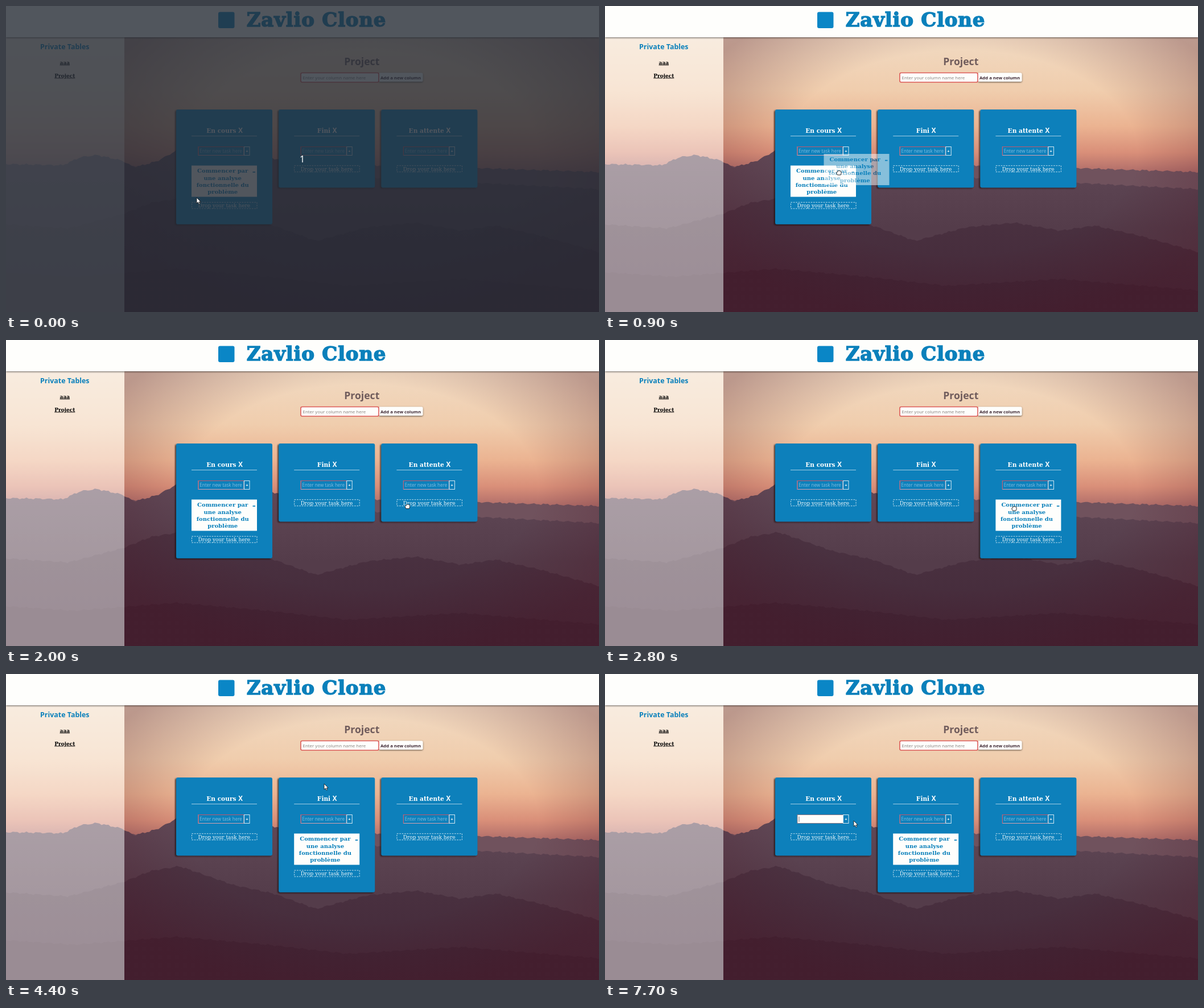
Animation of 1042 by 538 pixels, one loop 8 s. Source, as an HTML page:

```html
<!DOCTYPE html>
<html lang="fr">
<head>
<meta charset="utf-8">
<title>Task board</title>
<style>
  html, body { margin: 0; width: 100%; height: 100%; overflow: hidden; }
  svg { display: block; width: 1042px; height: 538px; }
  .sans { font-family: "Noto Sans", "Open Sans", sans-serif; }
  .serif { font-family: "DejaVu Serif", serif; }
  .bold { font-weight: 700; }
  .mid { text-anchor: middle; }
</style>
</head>
<body>
<svg viewBox="0 0 1042 538">
  <defs>
    <linearGradient id="sky" x2="0" y2="1">
      <stop offset="0" stop-color="#f1dac2"/>
      <stop offset=".35" stop-color="#f0cdad"/>
      <stop offset=".58" stop-color="#ebb391"/>
      <stop offset=".75" stop-color="#d98f79"/>
      <stop offset=".87" stop-color="#b26f6a"/>
      <stop offset="1" stop-color="#7d5560"/>
    </linearGradient>
    <linearGradient id="far" x2="0" y2="1">
      <stop offset="0" stop-color="#624a58"/>
      <stop offset=".5" stop-color="#543c4a"/>
    </linearGradient>
    <linearGradient id="near" x2="0" y2="1">
      <stop offset="0" stop-color="#4b3342"/>
      <stop offset="1" stop-color="#432838"/>
    </linearGradient>
    <radialGradient id="vignette" cx=".5" cy=".42" r=".62">
      <stop offset=".6" stop-color="#4a1020" stop-opacity="0"/>
      <stop offset="1" stop-color="#4a1020" stop-opacity=".32"/>
    </radialGradient>
    <filter id="drop" x="-10%" y="-10%" width="120%" height="120%">
      <feDropShadow dx="-2" dy="1.5" stdDeviation="1.2" flood-color="#1a0d18" flood-opacity=".75"/>
    </filter>
    <filter id="soft" x="-10%" y="-30%" width="120%" height="180%">
      <feDropShadow dx="0" dy="1" stdDeviation="1.5" flood-opacity=".6"/>
    </filter>
    <g id="card">
      <rect width="115" height="55" fill="#fefefc"/>
      <g class="serif bold mid" font-size="10" fill="#0a80bb">
        <text x="54.7" y="12.5">Commencer par</text>
        <text x="54.7" y="25">une analyse</text>
        <text x="54.7" y="37.4">fonctionnelle du</text>
        <text x="54.7" y="49.8">problème</text>
      </g>
      <rect x="107.5" y="10.7" width="4.5" height="1.7" fill="#0a80bb"/>
    </g>
    <path id="arrow" d="M0 0V10L2.4 7.8 4 11.4 5.7 10.6 4.2 7.2H7.2Z" fill="#fff" stroke="#111" stroke-width=".8"/>
    <path id="fist" d="M-4 0Q-4-1.5-2.3-1.3V-2.5Q-1.2-4 0-3 1.2-4 2.2-2.8 4-3.2 4-1V1.5L3 4H-2.5L-4 1.5Z" fill="#fff" stroke="#111" stroke-width=".9"/>
    <path id="beam" d="M-2-5.5H2M0-5.5V5.5M-2 5.5H2" fill="none" stroke="#222" stroke-width="1"/>
  </defs>

  <rect y="55" width="1042" height="270" fill="url(#sky)"/>
  <g id="ridges"></g>
  <rect x="208" y="55" width="834" height="483" fill="url(#vignette)"/>
  <rect y="55" width="208" height="483" fill="#fff" opacity=".47"/>

  <rect width="1042" height="55" fill="#fefefc" filter="url(#soft)"/>
  <rect x="373" y="10.5" width="28.5" height="28.5" rx="3" fill="#0a86c6"/>
  <text class="serif bold mid" x="545.5" y="36" font-size="34" letter-spacing=".8" fill="#0a80bb" stroke="#0a80bb" stroke-width="1.5">Zavlio Clone</text>

  <text class="sans mid" x="103.3" y="76" font-size="12.4" font-weight="600" fill="#0a80bb">Private Tables</text>
  <g class="serif bold mid" font-size="9" text-decoration="underline">
    <text x="103.3" y="102.5">aaa</text>
    <text x="103.3" y="125.5">Project</text>
  </g>

  <text class="sans bold mid" x="625.3" y="103.5" font-size="17.6" fill="#705c5c">Project</text>
  <rect x="655" y="117.5" width="77.5" height="15.5" rx="2.5" fill="#fefefc" filter="url(#soft)"/>
  <rect x="518" y="117.5" width="137" height="16.5" rx="2.5" fill="#fefefc" stroke="#dc5a58" stroke-width="1.6"/>
  <text class="sans" x="521.5" y="128.7" font-size="7.9" fill="#8c8684">Enter your column name here</text>
  <text class="sans bold mid" x="693.5" y="128.7" font-size="7.75" fill="#3a2430">Add a new column</text>

  <g id="board"></g>
</svg>
<script>
const LOOP = 8000, TICK = 100;
const BLUE = '#0a80bb';
const columns = [['En cours', 299], ['Fini', 479.2], ['En attente', 659.4]];

// Each ridge runs through a few [x, y] points, roughened with small waves.
function ridge(points, fill) {
  let d = 'M0 538';
  for (let x = 0, i = 0; x <= 1044; x += 4) {
    while (i < points.length - 2 && x > points[i + 1][0]) i++;
    const [x0, y0] = points[i], [x1, y1] = points[i + 1];
    const y = y0 + (y1 - y0) * (x - x0) / (x1 - x0) + Math.sin(x * .31) + .7 * Math.sin(x * .83);
    d += `L${x} ${y.toFixed(1)}`;
  }
  return `<path d="${d}V538Z" fill="${fill}"/>`;
}

document.getElementById('ridges').innerHTML =
  ridge([[0, 282], [640, 280], [830, 285], [1044, 292]], '#70525d') +
  ridge([[0, 278], [100, 280], [130, 266], [160, 262], [205, 272], [225, 284], [265, 273], [300, 254],
         [345, 241], [400, 247], [470, 268], [560, 288], [650, 302], [830, 311], [1044, 322]], 'url(#far)') +
  ridge([[0, 384], [110, 391], [208, 365], [255, 346], [305, 338], [400, 371], [470, 386], [545, 413],
         [635, 389], [720, 381], [800, 395], [860, 386], [940, 404], [1044, 433]], 'url(#near)') +
  ridge([[0, 468], [120, 476], [300, 462], [460, 476], [600, 492], [800, 480], [1044, 500]], '#402535');

// Pointer steps: time, x, y, shape, and the grab point of a dragged card.
const grabA = [26.5, 33], grabB = [33, 16];
const steps = [
  [0, 335, 337, 'arrow'], [100, 335, 338, 'fist'], [200, 350, 326, 'fist'], [400, 361, 314, 'fist'],
  [700, 384, 295, 'fist', grabA], [800, 397, 294, 'fist', grabA]
];
for (let i = 0; i <= 6; i++)
  steps.push([900 + i * TICK, 411 + i * 46.6, 293 - 3 * Math.sin(i * Math.PI / 4), 'fist', grabA]);
steps.push(
  [1600, 685.5, 297, 'fist', grabA], [1700, 672, 297, 'fist', grabA], [1800, 705.5, 292.5, 'fist', grabA],
  [2000, 705.5, 292.5, 'fist'], [2800, 719, 296, 'fist'],
  [2900, 704, 280, 'fist', grabB], [3000, 692, 290, 'fist', grabB], [3200, 640, 287, 'fist', grabB],
  [3300, 590, 285, 'fist', grabB], [3400, 556, 284, 'fist', grabB], [3700, 537, 282, 'fist', grabB],
  [3800, 539, 284, 'fist'], [4400, 559, 193, 'arrow'], [4500, 558.5, 159, 'arrow'],
  [4700, 558.5, 145, 'arrow'], [4900, 480, 205, 'arrow'], [5000, 402, 255, 'beam'],
  [7500, 415, 257, 'beam'], [7600, 430, 257, 'arrow'], [7700, 437, 258, 'arrow']
);

const use = (id, x, y, extra = '') => `<use href="#${id}" x="${x}" y="${y}" ${extra}/>`;

function column([name, x], hasCard, focused, caret) {
  const shift = hasCard ? 64.5 : 0;
  const field = focused
    ? `<rect x="39" y="65.5" width="80.5" height="15" fill="#fefefc" stroke="#8a7480"/>` +
      (caret ? '<path d="M42 68.5V78" stroke="#555" stroke-width=".8"/>' : '')
    : `<rect x="39" y="65.5" width="80" height="15" fill="none" stroke="#d6a0ae"/>
       <path d="M39 80.5V65.5H119" fill="none" stroke="#c4566a"/>
       <text class="sans" x="41.3" y="75.8" font-size="8" fill="#7dbade">Enter new task here</text>`;
  return `<g transform="translate(${x} 182)">
    <rect width="169" height="${137.3 + shift}" rx="3" fill="${BLUE}" filter="url(#drop)"/>
    <text class="serif bold mid" x="85" y="41" font-size="10.6" fill="#fff">${name}
      <tspan class="sans" font-size="11.5">X</tspan></text>
    <path d="M27 46.6H142" stroke="#a5cfe5"/>
    ${field}
    <rect x="119.5" y="65.5" width="9.5" height="15" fill="none" stroke="#d5e8f2"/>
    <text class="sans bold mid" x="124.3" y="75.6" font-size="7.5" fill="#fff">+</text>
    ${hasCard ? use('card', 27, 98.5) : ''}
    <g transform="translate(0 ${shift})">
      <rect x="27.5" y="98.7" width="114.5" height="11" fill="none" stroke="#d5e8f2" stroke-width=".9" stroke-dasharray="2.6 1.8"/>
      <text class="serif mid" x="84.3" y="107.5" font-size="9" fill="#f1f8fb">Drop your task here</text>
    </g>
  </g>`;
}

function scene(t) {
  const [, x, y, shape, grab] = steps.findLast(step => step[0] <= t);
  const owner = t < 2800 ? 0 : t < 4000 ? 2 : 1;
  const caret = t < 6500 || t >= 7500;
  const intro = t < 100
    ? `<rect width="1042" height="538" fill="#262c36" opacity=".8"/>
       <text class="sans mid" x="520.5" y="275" font-size="16" fill="#fff">1</text>` : '';
  return columns.map((c, i) => column(c, i === owner, i === 0 && t >= 5300, caret)).join('') +
    (grab ? use('card', x - grab[0], y - grab[1], 'opacity=".5"') : '') +
    intro + use(shape, x, y);
}

const board = document.getElementById('board');
let shown = -1;
function frame() {
  const t = Math.floor(performance.now() % LOOP / TICK) * TICK;
  if (t !== shown) board.innerHTML = scene(shown = t);
  requestAnimationFrame(frame);
}
frame();
</script>
</body>
</html>
```
